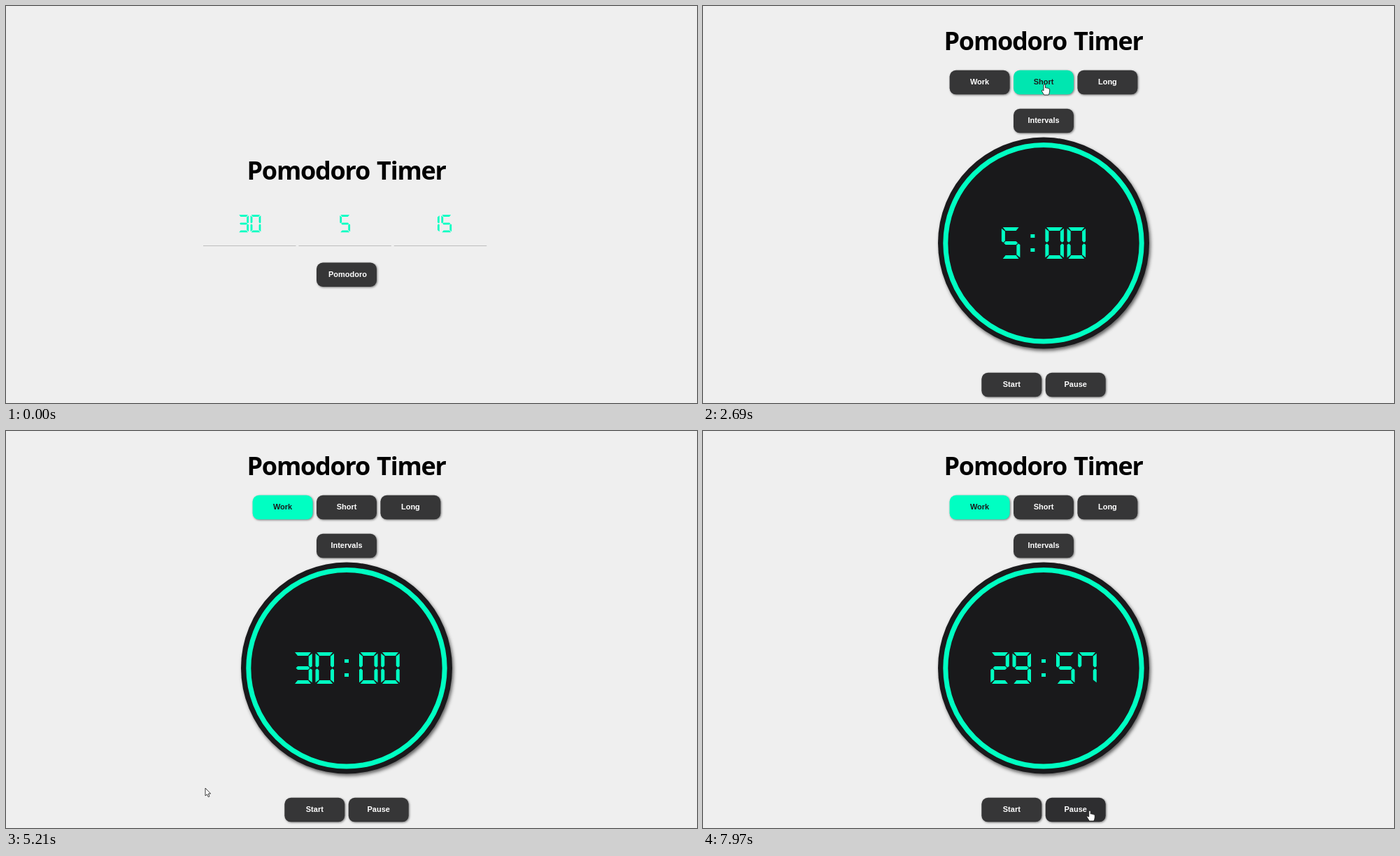
Animation of 988 by 567 pixels, one loop 8 s. Source, as an HTML page:

```html
<!DOCTYPE html>
<html lang="en">
<head>
<meta charset="utf-8">
<title>Pomodoro Timer</title>
<style>
html, body { margin: 0; width: 100%; height: 100%; overflow: hidden; background: #efefef; }
svg { display: block; width: 988px; height: 567px; }
.title { font: 700 36px "Noto Sans", "Open Sans", sans-serif; letter-spacing: -1.25px; word-spacing: 2px; }
.button { filter: drop-shadow(1px 1.5px 1.5px rgba(0, 0, 0, .5)); }
.button rect { fill: #363637; }
.button.hover rect { fill: #2e2e30; }
.button.on rect { fill: #00ffc2; }
.button.on.hover rect { fill: #00e6b0; }
.label { font: 700 11px "Liberation Sans", Arial, sans-serif; text-anchor: middle; fill: #fff; }
.on + .label { fill: #19191b; }
.line { stroke: #bdbdbd; }
.face { fill: #19191b; filter: drop-shadow(2px 3px 2.5px rgba(0, 0, 0, .6)); }
.ring { fill: none; stroke: #00ffc2; stroke-width: 7; }
.digits { fill: #00ffc2; }
.pointer { fill: #fff; stroke: #111; stroke-width: .8; stroke-linejoin: round; }
</style>
</head>
<body>
<svg viewBox="0 0 988 567">
  <text id="title" class="title" x="344.5">Pomodoro Timer</text>
  <g id="setup"></g>
  <g id="timer">
    <circle class="face" cx="487" cy="338.5" r="151"/>
    <circle class="ring" cx="487" cy="338.8" r="140.2"/>
    <path id="clock" class="digits"/>
  </g>
  <circle id="click" r="10" fill="#ff0" fill-opacity=".55"/>
  <g id="cursor" class="pointer">
    <path id="arrow" d="M0 0V11L2.5 8.8L4.2 12.6L6 11.8L4.3 8H7.6Z"/>
    <path id="hand" d="M-1.3 .8Q0 -.8 1.2 .8V5Q2.4 4 3.4 5.4Q4.6 4.4 5.4 5.9Q7 5.2 7.3 7V10Q7 12.5 5.8 15H-.6Q-2.5 12 -4.3 9Q-3.6 7 -1.3 9Z"/>
  </g>
</svg>
<script>
const LOOP = 8000, CENTER = 487;
const MINUTES = { Work: 30, Short: 5, Long: 15 };
const $ = id => document.getElementById(id);
const svgNode = (parent, tag, attrs) => {
  const node = document.createElementNS('http://www.w3.org/2000/svg', tag);
  for (const key in attrs) node.setAttribute(key, attrs[key]);
  return parent.appendChild(node);
};

// Seven-segment digits: width, height, bar thickness, gap, middle, half bar
const W = 26.5, H = 45, T = 5, G = .8, M = H / 2, B = T / 2;
const flipX = points => points.map(([x, y]) => [W - x, y]);
const flipY = points => points.map(([x, y]) => [x, H - y]);
const dot = y => [[W / 2 - 3, y], [W / 2 + 3, y], [W / 2 + 3, y + T], [W / 2 - 3, y + T]];
const bar = [[G + 1, 0], [W - G - 1, 0], [W - T - G, T], [T + G, T]];
const side = [[0, G + 1], [T, T + G], [T, M - B - G], [B, M - G], [0, M - B]];
const middle = [[B + G, M], [T + G, M - B], [W - T - G, M - B],
  [W - B - G, M], [W - T - G, M + B], [T + G, M + B]];
const SEGMENTS = {
  a: bar, b: flipX(side), c: flipX(flipY(side)), d: flipY(bar),
  e: flipY(side), f: side, g: middle, u: dot(2 * T), l: dot(6 * T)
};
const GLYPHS = {
  0: 'abcdef', 1: 'bc', 2: 'abged', 3: 'abgcd', 4: 'fgbc', 5: 'afgcd',
  6: 'afgcde', 7: 'fabc', 8: 'abcdefg', 9: 'abcdfg', ':': 'ul'
};
function digitPath(text, center, top, scale) {
  const pitch = 31.25;
  const left = center - text.length * pitch * scale / 2;
  return [...text].map((ch, n) => [...GLYPHS[ch]].map(s => {
    const points = SEGMENTS[s].map(([x, y]) =>
      [left + (n * pitch + (pitch - W) / 2 + x) * scale, top + y * scale]);
    return `M${points.join(' ')}Z`;
  }).join('')).join('');
}

const buttons = [];
function addRow(page, y, names, shift = 0) {
  const pitch = 91.4, width = 86, height = 34.5;
  names.forEach((name, i) => {
    const x = CENTER + (i - (names.length - 1) / 2) * pitch - width / 2;
    const box = svgNode($(page), 'g', { class: 'button' });
    svgNode(box, 'rect', { x, y, width, height, rx: 9 });
    const label = svgNode($(page), 'text', { class: 'label', x: x + width / 2 + shift, y: y + 20.5 });
    label.textContent = name;
    const contains = (px, py) => px >= x && px <= x + width && py >= y && py <= y + height;
    buttons.push({ page, name, box, contains });
  });
}
addRow('setup', 366.5, ['Pomodoro'], 1.5);
addRow('timer', 91.8, Object.keys(MINUTES));
addRow('timer', 146.8, ['Intervals']);
addRow('timer', 523.8, ['Start', 'Pause']);

Object.values(MINUTES).forEach((minutes, i) => {
  const x = 348.3 + i * 136.4;
  svgNode($('setup'), 'path', { class: 'line', d: `M${x - 66.3} 342.5h132.5` });
  svgNode($('setup'), 'path', { class: 'digits', d: digitPath(String(minutes), x, 298.3, .556) });
});

// Pointer moves; "press" is the click made after arriving
const ENTRY = { x: 953, y: 558 };
const MOVES = [
  { from: 70, to: 940, x: 481, y: 388, press: 1740 },
  { from: 2140, to: 2500, x: 488, y: 112, press: 2560, mode: 'Short' },
  { from: 2680, to: 3000, x: 581, y: 112, press: 3210, mode: 'Long' },
  { from: 3330, to: 3830, x: 414, y: 119, press: 3960, mode: 'Work' },
  { from: 4050, to: 4400, x: 451, y: 553, press: 4730 },
  { from: 4980, to: 5210, x: 285, y: 510 },
  { from: 5340, to: 5700, x: 273, y: 515 },
  { from: 5700, to: 6150, x: 284, y: 507 },
  { from: 6150, to: 6700, x: 528, y: 472 },
  { from: 6800, to: 7450, x: 553, y: 542 }
];
const HOLD = 70;
const OPENED = MOVES[0].press + HOLD;
const STARTED = MOVES[4].press + HOLD;

const smooth = k => k * k * (3 - 2 * k);
function pointerAt(t) {
  let { x, y } = ENTRY;
  for (const move of MOVES) {
    const k = smooth(Math.min(1, Math.max(0, (t - move.from) / (move.to - move.from))));
    x += (move.x - x) * k;
    y += (move.y - y) * k;
  }
  return [x, y];
}
const modeAt = t => MOVES.reduce((mode, m) => m.mode && t >= m.press ? m.mode : mode, 'Work');
function clockText(t) {
  const elapsed = Math.max(0, Math.floor((t - STARTED) / 1000));
  const seconds = MINUTES[modeAt(t - HOLD)] * 60 - elapsed;
  return `${Math.floor(seconds / 60)}:${String(seconds % 60).padStart(2, '0')}`;
}
const show = (id, visible) => { $(id).style.display = visible ? '' : 'none'; };

function draw(t) {
  const page = t < OPENED ? 'setup' : 'timer';
  const mode = modeAt(t - HOLD / 2);
  const [x, y] = pointerAt(t);
  const visible = t >= MOVES[0].from;
  let over = false;

  show('setup', page === 'setup');
  show('timer', page === 'timer');
  $('title').setAttribute('y', page === 'setup' ? 248 : 63);
  $('clock').setAttribute('d', digitPath(clockText(t), CENTER, 316, 1));

  for (const b of buttons) {
    const hit = visible && b.page === page && b.contains(x, y);
    over = over || hit;
    b.box.classList.toggle('hover', hit);
    b.box.classList.toggle('on', b.name === mode);
  }

  const place = `translate(${x} ${y})`;
  $('cursor').setAttribute('transform', place);
  $('click').setAttribute('transform', place);
  show('cursor', visible);
  show('hand', over);
  show('arrow', !over);
  show('click', MOVES.some(m => t >= m.press && t < m.press + HOLD));
}

const start = performance.now();
function tick() {
  draw((performance.now() - start) % LOOP);
  requestAnimationFrame(tick);
}
tick();
</script>
</body>
</html>
```
